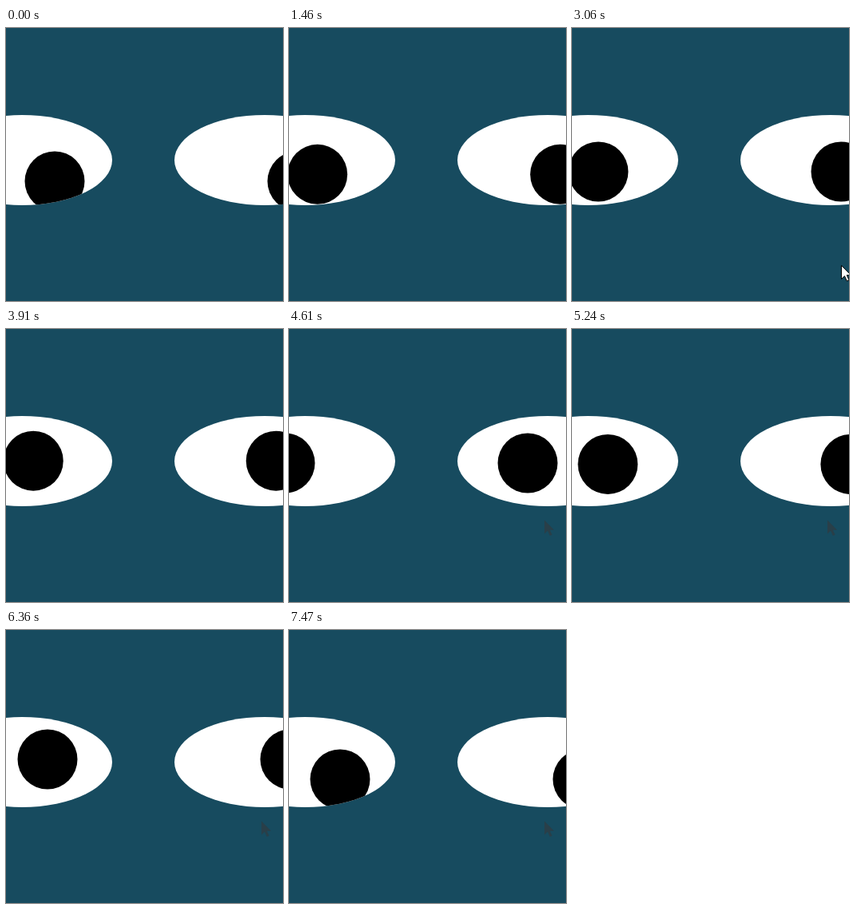
An HTML page that plays this animation: 347x342 px, repeating every 8000 ms.

```html
<!DOCTYPE html>
<html lang="en">
<head>
<meta charset="utf-8">
<title>Watching eyes</title>
<style>
  html, body { margin: 0; width: 100%; height: 100%; overflow: hidden; background: #174b5f; }
  svg { display: block; width: 347px; height: 342px; }
</style>
</head>
<body>
<svg viewBox="0 0 347 342">
  <defs>
    <ellipse id="white" cx="20" cy="165.5" rx="113" ry="56.5" fill="#fff"/>
    <clipPath id="lid"><use href="#white"/></clipPath>
    <g id="eye">
      <use href="#white"/>
      <g clip-path="url(#lid)"><circle id="pupil" r="37.5"/></g>
    </g>
    <path id="arrow" d="M0 0V17L4 13.2 6.8 19.5 9.6 18.3 6.8 12.2H12Z"/>
  </defs>
  <use href="#eye"/>
  <use href="#eye" x="304"/>
  <use id="trail" href="#arrow" x="320" y="239.5" fill="#293f49"/>
  <use id="cursor" href="#arrow" fill="#fff" stroke="#000"/>
</svg>
<script>
const LOOP = 8000, START = 1238, STEP = 70;

// The pupils circle clockwise around CENTER, on a flat orbit
const CENTER = { x: 20, y: 171 }, FLAT = 4;

// Poses the orbit passes through: step, left pupil x, y, full turns
const keys = [
  [-1, 61, 192, 0], [6, 24, 176, 0], [16, -9, 159, 0], [26, 33, 180, 1],
  [44, 32, 175.6, 2], [48, -5, 168, 2], [64, 18, 177, 3], [73, 52, 162, 4],
  [78, 60, 178, 4], [83, 48, 162, 4], [89, 64, 187, 4]
].map(([step, x, y, turns]) => {
  const dx = (CENTER.x - x) / FLAT, dy = y - CENTER.y;
  return { step, angle: Math.atan2(dx, dy) + turns * 2 * Math.PI, radius: Math.hypot(dx, dy) };
});

const byId = id => document.getElementById(id);
const pupil = byId("pupil"), cursor = byId("cursor"), trail = byId("trail");

const mix = (a, b, u) => a + (b - a) * u;

function pose(step) {
  const next = Math.max(1, keys.findIndex(k => k.step >= step));
  const a = keys[next - 1], b = keys[next];
  const u = (step - a.step) / (b.step - a.step);
  const angle = mix(a.angle, b.angle, u), radius = mix(a.radius, b.radius, u);
  return [CENTER.x - FLAT * radius * Math.sin(angle), CENTER.y + radius * Math.cos(angle)];
}

function place(el, x, y) {
  el.setAttribute("transform", `translate(${x} ${y})`);
}

const begin = performance.now();

function draw() {
  const t = (performance.now() - begin) % LOOP;
  const step = Math.min(89, Math.max(-1, Math.floor((t - START) / STEP)));
  const [x, y] = pose(step);
  place(pupil, x, y);
  // The pointer covers a far wider area than the pupils do
  place(cursor, Math.floor(48 + (x - 18) * 19.3) + 0.5, Math.floor(258 + (y - 177) * 13.3) + 0.5);
  trail.style.display = step > 44 ? "" : "none";
  requestAnimationFrame(draw);
}
draw();
</script>
</body>
</html>
```
